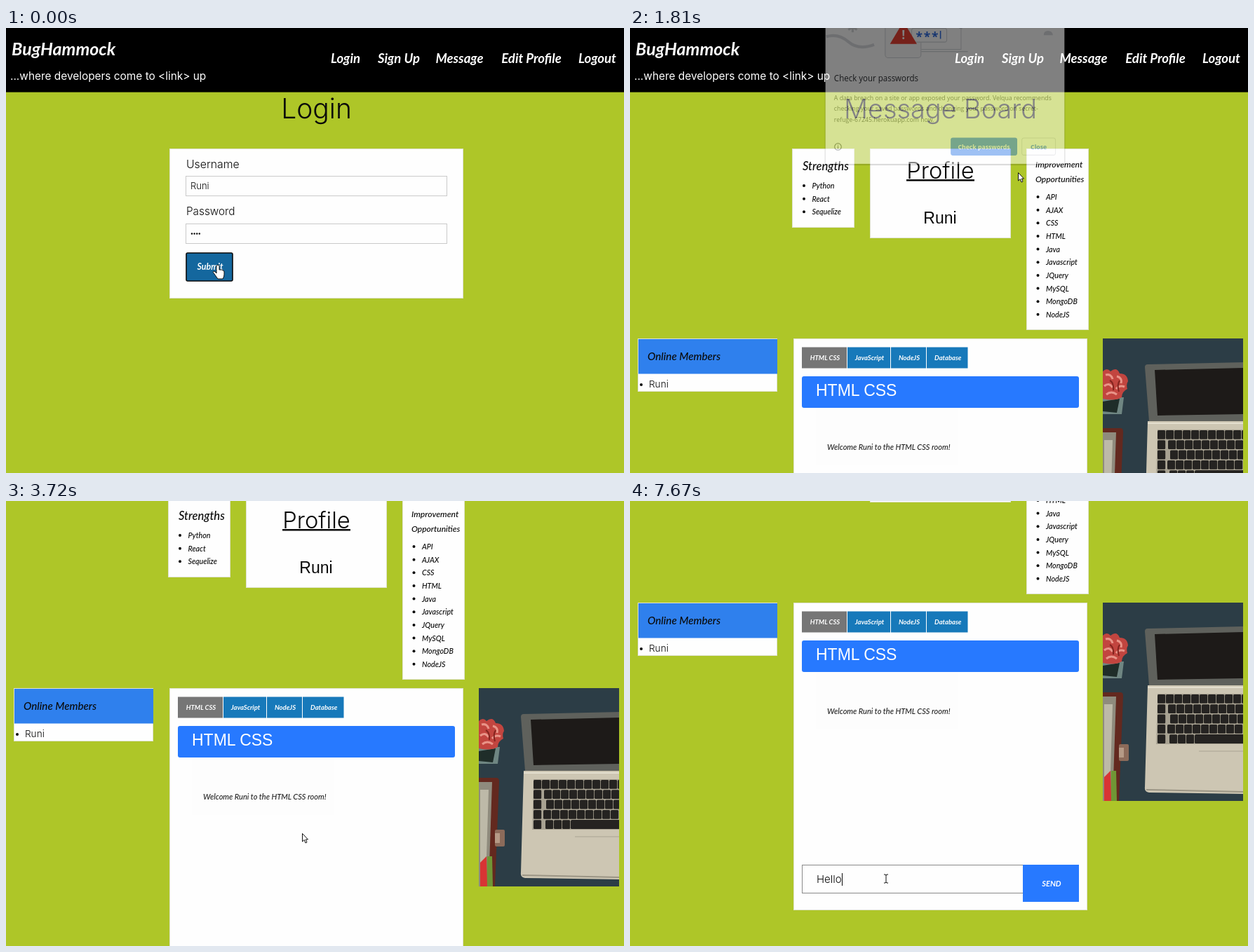
Recreate the animation shown at these times as an HTML page. Size 881 by 635 pixels, loop 8 s.

```html
<!DOCTYPE html>
<html lang="en">
<head>
<meta charset="utf-8">
<title>Message board demo</title>
<style>
  html, body { margin: 0; width: 100%; height: 100%; overflow: hidden; background: #aec628; }
  svg { display: block; }
  text { white-space: pre; }
  .sans { font-family: Inter, sans-serif; }
  .hand { font-family: Lato, sans-serif; font-style: italic; font-weight: 500; }
  .bold { font-weight: 700; }
  .arial { font-family: "Liberation Sans", Arial, sans-serif; }
  .ui { font-family: "Open Sans", sans-serif; }
  .mid { text-anchor: middle; }
  .light { font-weight: 300; }
</style>
</head>
<body>
<svg id="stage" width="881" height="635" viewBox="0 0 881 635"></svg>
<script>
const USER = 'Runi', SITE = 'BugHammock', BROWSER = 'Velqua';
const LOOP = 8000, BLUE = '#2779ff';

// Drawing helpers
const rect = (x, y, w, h, fill, more = '') =>
  `<rect x="${x}" y="${y}" width="${w}" height="${h}" fill="${fill}" ${more}/>`;
const path = (d, fill, stroke = 'none', width = 1) =>
  `<path d="${d}" fill="${fill}" stroke="${stroke}" stroke-width="${width}"/>`;
const text = (x, y, size, style, str, fill = '#0a0a0a') =>
  `<text x="${x}" y="${y}" font-size="${size}" class="${style}" fill="${fill}">${str}</text>`;
const dot = (x, y, r, fill = '#0a0a0a') => `<circle cx="${x}" cy="${y}" r="${r}" fill="${fill}"/>`;
const group = (id, body) => `<g id="${id}">${body}</g>`;
const card = (x, y, w, h) => rect(x + .5, y + .5, w - 1, h - 1, '#fefefe', 'stroke="#dfe2d0"');
const list = (x, y, items) => items.map((item, i) =>
  dot(x, y - 4 + i * 18.65, 2) + text(x + 11.5, y + i * 18.65, 10.7, 'hand', item)).join('');

function header() {
  const links = [['Login', 484], ['Sign Up', 560], ['Message', 646.5], ['Edit Profile', 749], ['Logout', 843]];
  return rect(0, 0, 881, 91.6, '#000') +
    text(8, 39, 25, 'hand bold', SITE, '#fff') +
    text(6, 74, 15.4, 'sans', '...where developers come to &lt;link&gt; up', '#fff') +
    links.map(([label, x]) => text(x, 50, 18.6, 'hand bold mid', label, '#fff')).join('');
}

function loginPage() {
  const field = y => rect(256.5, y + .5, 372, 28, '#fefefe', 'stroke="#cacaca"');
  return text(442.5, 129, 39, 'sans light mid', 'Login') +
    card(233, 172, 419, 214) +
    text(257, 200, 15.8, 'sans light', 'Username') + field(211) +
    text(263, 230, 13, 'sans light', USER) +
    text(257, 267, 15.3, 'sans light', 'Password') + field(279) +
    [0, 1, 2, 3].map(i => dot(265 + i * 3.6, 293.5, 1.2)).join('') +
    rect(257, 321, 66, 40, '#14679e', 'rx="2" stroke="#0a0a0a" stroke-width="1.6"') +
    text(291, 345, 12.4, 'hand bold mid', 'Submit', '#fff');
}

function photo() {
  let keys = '';
  for (let row = 0; row < 5; row++)
    for (let col = 0; col < 11; col++)
      keys += rect(78 + col * 12 + (col ? row * 3 % 7 : 0), 131 + row * 14.3, 11.2, 12.8, '#252321', 'rx="1.5"');
  return `<svg x="674" y="443" width="200" height="283">` +
    rect(0, 0, 200, 283, '#2c3d46') +
    // flowers in a pot
    path('M0 84H30L27 108H0Z', '#6f8682') + path('M0 90L24 86L20 106L0 104Z', '#1f2d29') +
    path('M0 47Q6 41 11 47Q20 40 24 50Q35 50 36 61Q33 66 35 72Q27 76 27 84Q17 90 0 86Z', '#c2453f') +
    path('M4 52Q12 50 14 58M20 54Q28 56 26 64M2 68Q9 62 14 70M19 72Q24 66 31 69M5 80Q12 74 20 80', 'none', '#e99488', 3) +
    path('M10 60Q16 63 15 74M24 60Q20 66 23 76', 'none', '#84241f', 2) +
    // notebook
    path('M0 128H25Q29 128 29 133L23 283H0Z', '#63291f') +
    path('M0 134H19L14 283H0Z', '#8f8b7d') + path('M2 145H14L11 240L2 262Z', '#bdb9a8') +
    path('M12 240H19L20 283H11Z', '#709635') + path('M2 249L11 240L12 283H2Z', '#d83434') +
    rect(23, 202, 14, 24, '#8c6b5a', 'rx="2"') + rect(23, 207, 7, 14, '#b59a86') +
    // laptop
    path('M60 41Q60 37 64 37L200 34V118H66Z', '#5f615c') +
    path('M74 45L200 42V108L78 110Z', '#1d1a18') +
    path('M64 118H200V273L66 271Q59 270 60 263Z', '#cdc6b3') +
    path('M64 121H200', 'none', '#e4dfcf', 2) +
    path('M62 267L200 270', 'none', '#9b9585', 2) +
    path('M78 130H200V202H76Z', '#a8a292') + keys + rect(132, 188, 68, 13, '#252321', 'rx="1"') +
    path('M137 212H200', 'none', '#aaa493') + '</svg>';
}

function boardPage() {
  const tabs = [['HTML CSS', 245, 64], ['JavaScript', 310, 61], ['NodeJS', 372, 50], ['Database', 423, 58.5]];
  return text(442.5, 129, 37.8, 'sans light mid', 'Message Board') +
    card(231, 172, 89, 113) + text(246, 203, 16.6, 'hand', 'Strengths') +
    list(248, 229, ['Python', 'React', 'Sequelize']) +
    card(342, 172, 201, 128) + text(442.5, 215, 32.7, 'sans light mid', 'Profile') +
    rect(394, 216, 97, 2.5, '#0a0a0a') + text(442, 279, 23, 'arial mid', USER) +
    card(565, 172, 89, 259) + text(578, 199, 12.2, 'hand', 'Improvement') +
    text(578, 220, 12, 'hand', 'Opportunities') +
    list(581.5, 245, ['API', 'AJAX', 'CSS', 'HTML', 'Java', 'Javascript', 'JQuery', 'MySQL', 'MongoDB', 'NodeJS']) +
    card(11, 443, 199, 76) + rect(12, 444, 198, 49.5, '#2f80ed') +
    text(25, 474, 15.2, 'hand', 'Online Members') + dot(16, 509, 2) + text(27, 513, 13.6, 'sans light', USER) +
    card(233, 443, 419, 439) +
    tabs.map(([label, x, w], i) => rect(x, 455.5, w, 30, i ? '#1779ba' : '#767676') +
      text(x + w / 2 + 1, 474, 9.5, 'hand bold mid', label, '#fff')).join('') +
    rect(245, 497, 395, 45, BLUE, 'rx="3"') + text(265, 525, 23, 'arial', 'HTML CSS', '#fff') +
    rect(265, 543, 203, 81, '#fdfdfd') +
    text(281, 602, 11, 'hand', `Welcome ${USER} to the HTML CSS room!`, '#222') +
    rect(245.5, 817.5, 394, 40, '#fefefe', 'id="entry" stroke="#cacaca"') +
    rect(560, 817, 80, 53, BLUE) + text(601, 848, 11, 'hand bold mid', 'SEND', '#fff') +
    `<text id="typed" x="266" y="843" font-size="15" class="sans light" fill="#0a0a0a"></text>` +
    rect(265, 829, 1, 18, '#0a0a0a', 'id="caret"') +
    photo();
}

function popup() {
  const lines = [`A data breach on a site or app exposed your password. ${BROWSER} recommends`,
    'checking your saved passwords and changing your password on secret-',
    'refuge-67245.herokuapp.com now.'];
  const star = [0, 60, 120].map(a =>
    `<path d="M320 3V17" stroke="#d5d7da" stroke-width="3" transform="rotate(${a} 320 10)"/>`).join('');
  return rect(281, -8, 336, 208, '#000', 'opacity=".28" rx="2"') + rect(282, -8, 334, 206, '#fff') +
    path('M283 23Q300 18 314 30T350 34', 'none', '#dadce0', 4) + star +
    path('M471 12Q472 3 487 -2', 'none', '#c9cdd2', 4) +
    path('M587 21Q587 15 593 15T600 21Z', '#dadce0') +
    path('M471.5 -5V40.5H416M416 43.5H481', 'none', '#d2d5d9') +
    rect(365.5, -8, 50, 60, '#fbfbfc', 'rx="4" stroke="#d2d5d9"') +
    rect(402.5, 11.5, 49, 19, '#fff', 'rx="3" stroke="#d2d5d9"') +
    path('M391 4L408 32H374Z', '#e94235', '#e94235', 2) + text(391, 27, 17, 'ui bold mid', '!', '#fff') +
    [413, 424, 435].map(x => text(x, 29, 17, 'ui bold mid', '*', '#2d6ae0')).join('') +
    rect(442, 15, 1.5, 11, '#2d6ae0') +
    text(294, 84, 11.3, 'ui', 'Check your passwords', '#303236') +
    lines.map((line, i) => text(294, 110 + i * 15, 8.6, 'ui', line, '#62666b')).join('') +
    '<circle cx="299.5" cy="174.5" r="4.7" fill="none" stroke="#5f6368"/>' +
    rect(299, 173.5, 1, 4, '#5f6368') + rect(299, 171.5, 1, 1, '#5f6368') +
    rect(457, 162, 93, 24.5, '#4086eb', 'rx="3"') + text(503.5, 177.5, 8.5, 'ui bold mid', 'Check passwords', '#fff') +
    rect(556.5, 162.5, 47, 23.5, '#fff', 'rx="3" stroke="#dadce0"') + text(580, 177.5, 8.5, 'ui bold mid', 'Close', '#3b7fe4');
}

const pointers = {
  finger: path('M3 12V2Q3 0 5 0T7 2V7Q11 6 14 9V14Q14 17 12 20H5L0 13Q-3 10 -1 9Q1 9 3 12Z', '#fff', '#111'),
  arrow: path('M.5 .5V12L3.2 9.5L5 14L7 13L5.2 9H8.5Z', '#fff', '#111'),
  beam: path('M-3 -6H-1L0 -5L1 -6H3M0 -5V5M-3 6H-1L0 5L1 6H3', 'none', '#111')
};

const stage = document.getElementById('stage');
stage.innerHTML = rect(0, 0, 881, 635, '#aec628') +
  group('page', header() + group('login', loginPage()) + group('board', boardPage())) +
  group('popup', popup()) +
  group('pointer', Object.entries(pointers).map(([id, body]) => group(id, body)).join(''));
const $ = id => document.getElementById(id);
const show = (id, on) => $(id).setAttribute('display', on ? 'inline' : 'none');

// Screen refreshes: first time, last time, number of evenly spaced steps
const bursts = [[270, 1210, 7], [1360, 2080, 6], [2360, 2480, 2], [2880, 3840, 8], [3960, 4860, 8],
  [5010, 5010, 1], [5540, 5540, 1], [5820, 5820, 1], [6350, 6350, 1], [6620, 6620, 1], [6900, 7670, 5]];
const moments = [0, ...bursts.flatMap(([a, b, n]) =>
  Array.from({ length: n }, (_, i) => a + (b - a) * i / Math.max(1, n - 1)))].map(m => [m]);

const scrolls = [[0, 0], [2360, 68], [2480, 108], [3700, 176], [3840, 298]];
const typing = [[0, '', false], [5010, '', true], [5540, 'H', true], [5820, 'He', true], [6350, 'He', false],
  [6620, 'H', false], [6900, 'H', true], [7090, 'He', true], [7280, 'Hel', true], [7470, 'Hell', true], [7670, 'Hello', true]];
const route = [[0, 297, 338], [270, 300, 335], [1053, 386, 305], [1210, 420, 280], [1648, 580, 175], [1792, 553, 206],
  [2080, 517, 349], [2480, 517, 349], [3566, 422, 474], [3840, 422, 474], [4860, 377, 540], [5010, 377, 540], [5540, 365, 539]];
const fade = [[0, 0], [583, 0], [897, 1], [1648, 1], [1936, 0]];

const held = (keys, t) => keys.findLast(key => key[0] <= t);
function tween(keys, t) {
  const from = held(keys, t), to = keys[keys.indexOf(from) + 1] || from;
  const p = to === from ? 0 : (t - from[0]) / (to[0] - from[0]);
  return from.slice(1).map((v, i) => v + (to[i + 1] - v) * p);
}

function draw(time) {
  const t = held(moments, time + .01)[0];
  show('login', t < 270);
  show('board', t >= 270);
  $('page').setAttribute('transform', `translate(0 ${-held(scrolls, t)[1]})`);

  const [alpha] = tween(fade, t), away = 1 - alpha;
  show('popup', alpha > 0);
  $('popup').setAttribute('opacity', alpha);
  $('popup').setAttribute('transform',
    `translate(${-18 * away} ${-23 * away}) scale(${1 + .04 * away} ${1 + .074 * away})`);

  const [x, y] = tween(route, t);
  $('pointer').setAttribute('transform', `translate(${x} ${y})`);
  const kind = t < 270 ? 'finger' : y > 524 ? 'beam' : 'arrow';
  for (const id in pointers) show(id, id === kind);

  const [, str, caretOn] = held(typing, t + 5);
  $('typed').textContent = str;
  $('entry').setAttribute('stroke', t >= 4730 ? '#8a8a8a' : '#cacaca');
  show('caret', caretOn);
  $('caret').setAttribute('x', str ? Math.round(266 + $('typed').getComputedTextLength()) : 265);
}

function tick() {
  draw(performance.now() % LOOP);
  requestAnimationFrame(tick);
}
tick();
</script>
</body>
</html>
```
